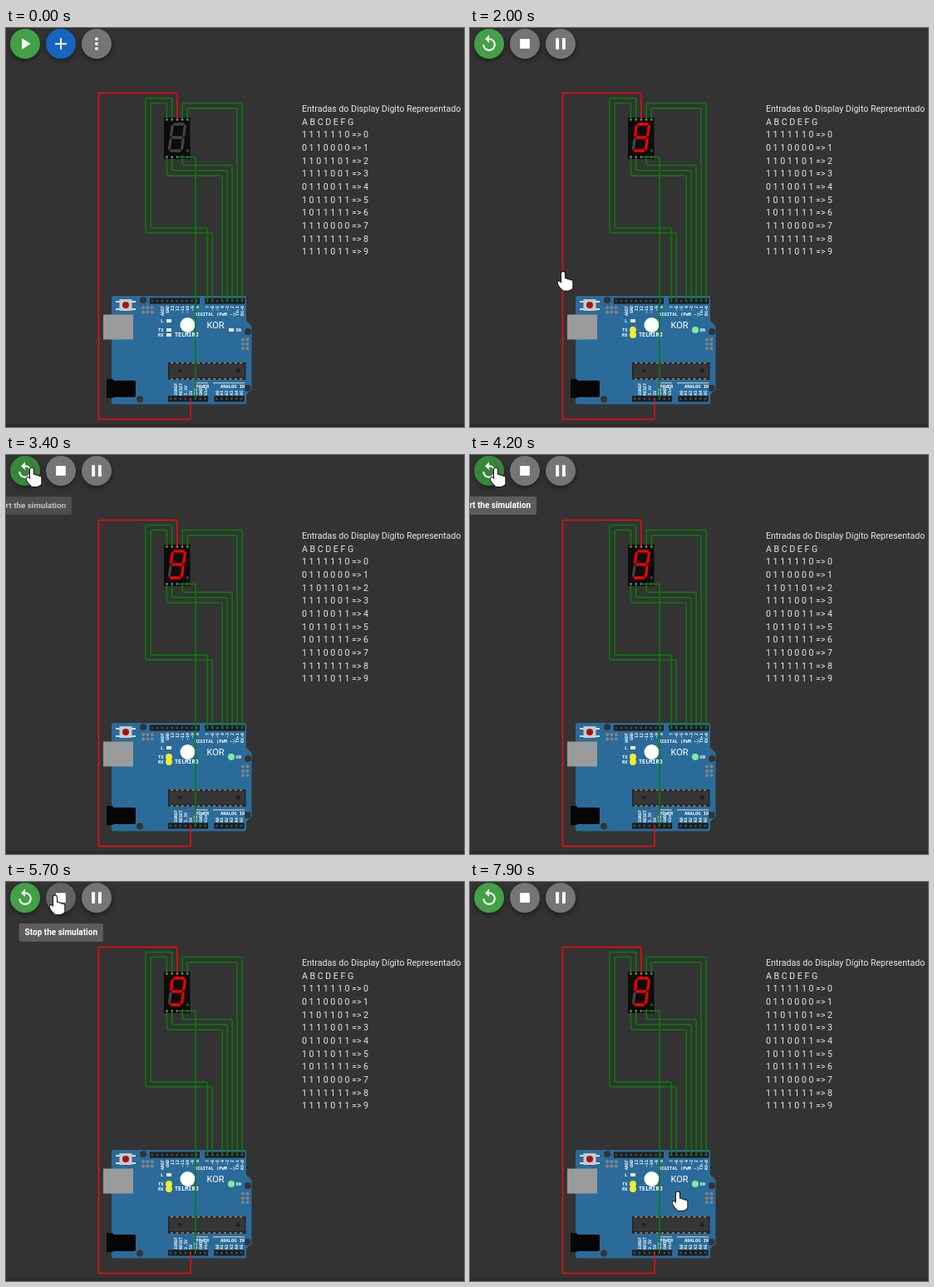
Animation, 551 px wide and 481 px high, one loop 8000 ms. Source, as an HTML page with a canvas:

```html
<!DOCTYPE html>
<html lang="pt">
<head>
<meta charset="utf-8">
<title>Simulador</title>
<style>
html, body { margin: 0; width: 100%; height: 100%; overflow: hidden; background: #333; }
canvas { display: block; }
</style>
</head>
<body>
<canvas id="stage" width="551" height="481"></canvas>
<script>
const ctx = document.getElementById('stage').getContext('2d');
const LOOP = 8000, STEP = 100;
const BG = '#333333';
const SANS = 'Roboto, sans-serif';
const TINY = '"DejaVu Sans Mono", monospace';

const clamp01 = v => Math.max(0, Math.min(1, v));
const ramp = (t, from, to) => clamp01((t - from) / (to - from));
const pulse = (t, on, off, fade = 200) => ramp(t, on, on + fade) * (1 - ramp(t, off, off + fade));
const ease = k => k * k * (3 - 2 * k);
const mix = (a, b, k) => a + (b - a) * k;

function repeat(n, fn) {
  for (let i = 0; i < n; i++) fn(i);
}

function rect(x, y, w, h, color) {
  ctx.fillStyle = color;
  ctx.fillRect(x, y, w, h);
}

function rounded(x, y, w, h, r, color) {
  ctx.fillStyle = color;
  ctx.beginPath();
  ctx.roundRect(x, y, w, h, r);
  ctx.fill();
}

function dot(x, y, r, color) {
  ctx.fillStyle = color;
  ctx.beginPath();
  ctx.arc(x, y, r, 0, Math.PI * 2);
  ctx.fill();
}

function polygon(points, color) {
  ctx.fillStyle = color;
  ctx.beginPath();
  for (const [x, y] of points) ctx.lineTo(x, y);
  ctx.closePath();
  ctx.fill();
}

function text(str, x, y, font, color = '#fff', align = 'left') {
  ctx.font = font;
  ctx.fillStyle = color;
  ctx.textAlign = align;
  ctx.fillText(str, x, y);
}

function upright(str, x, y, align = 'left') {
  ctx.save();
  ctx.translate(x, y);
  ctx.rotate(-Math.PI / 2);
  text(str, 0, 2, `bold 5px ${TINY}`, '#fff', align);
  ctx.restore();
}

// ---- toolbar ----

const ICONS = {
  play: () => polygon([[-4, -7], [7, 0], [-4, 7]], '#fff'),
  stop: () => rect(-6, -6, 12, 12, '#fff'),
  pause: () => repeat(2, i => rect(8 * i - 6, -7, 4, 14, '#fff')),
  more: () => repeat(3, i => dot(0, 6 * i - 6, 2, '#fff')),
  add() {
    rect(-7, -1, 14, 2, '#fff');
    rect(-1, -7, 2, 14, '#fff');
  },
  restart() {
    ctx.strokeStyle = '#fff';
    ctx.lineWidth = 2;
    ctx.beginPath();
    ctx.arc(0, 1, 7, -Math.PI / 2, Math.PI);
    ctx.stroke();
    polygon([[0, -11], [-5, -6], [0, -1]], '#fff');
  }
};

const buttonX = slot => 23 + 43 * slot;

function button(slot, icon, color, hover = 0) {
  ctx.save();
  ctx.translate(buttonX(slot), 19);
  ctx.save();
  ctx.shadowColor = 'rgba(0,0,0,.45)';
  ctx.shadowBlur = 6;
  ctx.shadowOffsetY = 2.5;
  dot(0, 0, 18, color);
  ctx.restore();
  dot(0, 0, 18, `rgba(0,0,0,${0.16 * hover})`);
  ctx.scale(0.97, 0.97);
  ICONS[icon]();
  ctx.restore();
}

function toolbar(t, running) {
  const first = pulse(t, 300, 1300) + pulse(t, 2600, 4700);
  button(0, running ? 'restart' : 'play', '#43a047', first);
  button(1, running ? 'stop' : 'add', running ? '#757575' : '#1565c0', pulse(t, 4700, 6500));
  button(2, running ? 'pause' : 'more', '#757575');
}

function tooltip(label, slot, alpha) {
  if (alpha <= 0) return;
  const font = `bold 10px ${SANS}`;
  const size = mix(0.95, 1, alpha);
  ctx.save();
  ctx.globalAlpha = alpha;
  ctx.translate(buttonX(slot) + 0.3, 61);
  ctx.scale(size, size);
  ctx.font = font;
  const w = ctx.measureText(label).width + 14;
  rounded(-w / 2, -11, w, 22, 3, '#5d5d5d');
  text(label, 0, 3, font, '#fff', 'center');
  ctx.restore();
}

// ---- notes ----

const CODES = '1111110 0110000 1101101 1111001 0110011 1011011 1011111 1110000 1111111 1111011';

function notes() {
  const spaced = word => [...word].join(' ');
  const lines = ['Entradas do Display Dígito Representado', spaced('ABCDEFG'),
    ...CODES.split(' ').map((code, digit) => `${spaced(code)} => ${digit}`)];
  lines.forEach((line, i) =>
    text(line, 356, Math.round(101 + i * 15.67), `10.6px ${SANS}`, '#e8e8e8'));
}

// ---- seven segment display ----

const displayPin = i => 193.5 + 6.2 * i;

function segment(col, row, horizontal, color) {
  const bar = [[0, 0], [1, -1], [7, -1], [8, 0], [7, 1], [1, 1]];
  const x0 = 1 + 8 * col, y0 = 1 + 8 * row;
  polygon(bar.map(([along, across]) => {
    const u = x0 + (horizontal ? along : across);
    const v = y0 + (horizontal ? across : along);
    return [194 + 1.9 * u + 0.27 * (18 - v), 114 + 2 * v];
  }), color);
  ctx.lineWidth = 0.6;
  ctx.strokeStyle = '#0c0c0c';
  ctx.stroke();
}

function display(running) {
  const shade = name => running && name !== 'e' ? '#ff0000' : '#444';
  rect(190, 108, 31.5, 50, '#0c0c0c');
  repeat(5, i => {
    dot(displayPin(i), 110.5, 1.2, '#999');
    dot(displayPin(i), 155.5, 1.2, '#999');
  });
  [...'agd'].forEach((name, row) => segment(0, row, true, shade(name)));
  [...'febc'].forEach((name, i) => segment(i >> 1, i % 2, false, shade(name)));
  dot(218.5, 148, 1.7, '#444');
}

// ---- board ----

const PITCH = 5.95;
const digitalPin = n => 284 - PITCH * n;
const powerPin = n => 198 + 6 * n;

function header(x, y, pins) {
  rect(x - 3, y - 3.5, pins * PITCH + 0.5, 7, '#1b1b1b');
  repeat(pins, i => rect(x + i * PITCH - 1.4, y - 1.4, 2.8, 2.8, '#474747'));
}

function pads(x, y, cols, rows) {
  repeat(cols * rows, i =>
    dot(x + (i % cols) * 5.4, y + Math.floor(i / cols) * 5.4, 2, '#848484'));
}

function labels(words, x, y, align) {
  words.split(' ').forEach((word, i) => upright(word, x + i * PITCH, y, align));
}

function lamp(name, x, y, labelX, glow) {
  text(name, labelX, y + 2, `bold 5.4px ${TINY}`);
  rect(x - 3, y - 2, 6, 4, '#e8e8e8');
  if (glow) dot(x, y, 4, glow);
}

function chip() {
  rect(195, 403, 93.5, 21, '#262626');
  repeat(14, i => {
    rect(198 + 6.4 * i, 403, 3, 2, '#777');
    rect(198 + 6.4 * i, 422, 3, 2, '#777');
  });
  rect(196.5, 405.5, 90.5, 15.5, '#363636');
  dot(209, 413, 2.3, '#222');
  dot(279, 413, 2.8, '#222');
}

function board(running) {
  const blue = '#2b6b99';
  rounded(127, 323, 162, 130.5, 2, blue);
  polygon([[289, 353], [295.5, 359], [295.5, 436], [289, 442]], blue);
  dot(165, 328, 4, BG);
  dot(161, 447.5, 4, BG);
  dot(291, 366, 4, BG);
  dot(290.5, 434, 4, BG);

  rect(117, 345.5, 36, 30, '#9b9b9b');
  rounded(121, 423, 8, 23, 1, '#050505');
  rounded(126, 425, 30, 20, 2, '#050505');

  repeat(2, i => rect(132, 329 + 9 * i, 24, 2, '#ddd'));
  rect(136.5, 327, 15, 14, '#c9c9c9');
  dot(144, 334, 4, '#9b1616');
  pads(165, 337, 3, 2);
  pads(285, 375.5, 2, 3);

  header(176, 329, 10);
  header(digitalPin(7), 329, 8);
  header(powerPin(0), 447, 8);
  header(253.5, 447, 6);

  const tag = `bold 5.4px ${TINY}`;
  labels('AREF GND 13 12 ~11 ~10 ~9 8', 188, 335, 'right');
  labels('7 ~6 ~5 4 ~3 2 TX▸1 RX◂0', digitalPin(7), 335, 'right');
  labels('IOREF RESET 3.3V 5V GND GND Vin', powerPin(1), 443);
  labels('A0 A1 A2 A3 A4 A5', 253.5, 443);
  text('DIGITAL (PWM ~)', 227, 346.5, tag);
  text('POWER', 228, 433.5, tag);
  text('ANALOG IN', 258, 433.5, tag);
  rect(228, 427.5, 15, 0.8, '#fff');
  rect(249, 427.5, 38, 0.8, '#fff');

  lamp('L', 196, 353, 186);
  lamp('TX', 196, 364, 183, running && '#efea38');
  lamp('RX', 196, 370, 183, running && '#efea38');
  lamp('ON', 271, 364, 276.5, running && '#7cee98');

  dot(218.5, 358, 9, '#fff');
  text('TELMIRO', 203, 372, `bold 6.8px ${TINY}`);
  text('KOR', 241.5, 362, `11px ${SANS}`);
  chip();
}

// ---- wires ----

function wire(color, ...points) {
  ctx.strokeStyle = color;
  ctx.lineWidth = 1.5;
  ctx.beginPath();
  ctx.moveTo(...points[0]);
  for (let i = 1; i < points.length - 1; i++) {
    ctx.arcTo(...points[i], ...points[i + 1], 2);
  }
  ctx.lineTo(...points.at(-1));
  ctx.stroke();
}

// Leaves a display pin at startY, runs along y and drops into a board pin.
function hop(color, from, startY, y, to, endY) {
  wire(color, [from, startY], [from, y], [to, y], [to, endY]);
}

function wires() {
  const green = '#068006', red = '#f80808';
  const top = 110, bottom = 156, socket = 329, power = 447;

  wire(red, [displayPin(2), top], [displayPin(2), 78.5], [111.5, 78.5],
    [111.5, 471.8], [powerPin(4), 471.8], [powerPin(4), power]);
  wire(green, [displayPin(2), 155.5], [powerPin(5), 155.5], [powerPin(5), power]);

  repeat(2, k => {
    const pin = displayPin(1 - k), left = 168 + 6 * k, over = 84.5 + 6 * k;
    const under = 247 - 6 * k, target = digitalPin(6 + k);
    wire(green, [pin, top], [pin, over], [left, over], [left, under],
      [target, under], [target, socket]);
    hop(green, displayPin(3 + k), top, 90.5 + 6.3 * k, digitalPin(k), socket);
  });
  [0, 1, 3].forEach((pin, k) =>
    hop(green, displayPin(pin), bottom, 178 - 6.3 * k, digitalPin(4 - k), socket));
}

// ---- pointer ----

const HAND = new Path2D();
repeat(4, i => HAND.roundRect(-2 + 3.1 * i, i && 7 + i, 4, 14 - i, 2));
HAND.roundRect(-2, 12, 13, 10.5, [0, 0, 5, 4]);
HAND.ellipse(-3, 16, 2, 5, -0.55, 0, Math.PI * 2);

const GLIDES = [
  { from: 200, to: 800, x: 21, y: 29.5 },
  { from: 1200, to: 1500, x: 24, y: 60 },
  { from: 1600, to: 2000, x: 112, y: 294 },
  { from: 2100, to: 2800, x: 31, y: 15.5 },
  { from: 4700, to: 4900, x: 59, y: 16.5 },
  { from: 6300, to: 6500, x: 366, y: 455 },
  { from: 6600, to: 7500, x: 250, y: 373.5 }
];

function pointer(t) {
  let x = 16, y = -23;
  for (const glide of GLIDES) {
    const k = ease(ramp(t, glide.from, glide.to));
    x = mix(x, glide.x, k);
    y = mix(y, glide.y, k);
  }
  ctx.save();
  ctx.translate(x, y);
  ctx.strokeStyle = '#111';
  ctx.lineWidth = 2;
  ctx.stroke(HAND);
  ctx.fillStyle = '#fff';
  ctx.fill(HAND);
  ctx.restore();
}

function draw(t) {
  const running = t >= 1200;
  rect(0, 0, 551, 481, BG);
  rect(0, 477, 551, 4, '#2c2c2c');
  notes();
  board(running);
  display(running);
  wires();
  toolbar(t, running);
  tooltip('Start the simulation', 0, pulse(t, 600, 1200));
  tooltip('Restart the simulation', 0, pulse(t, 3270, 5100));
  tooltip('Stop the simulation', 1, pulse(t, 5400, 6700));
  pointer(t);
}

// The screen advances ten times a second.
function loop() {
  const t = performance.now() % LOOP;
  draw(Math.floor(t / STEP) * STEP);
  requestAnimationFrame(loop);
}
loop();
</script>
</body>
</html>
```
